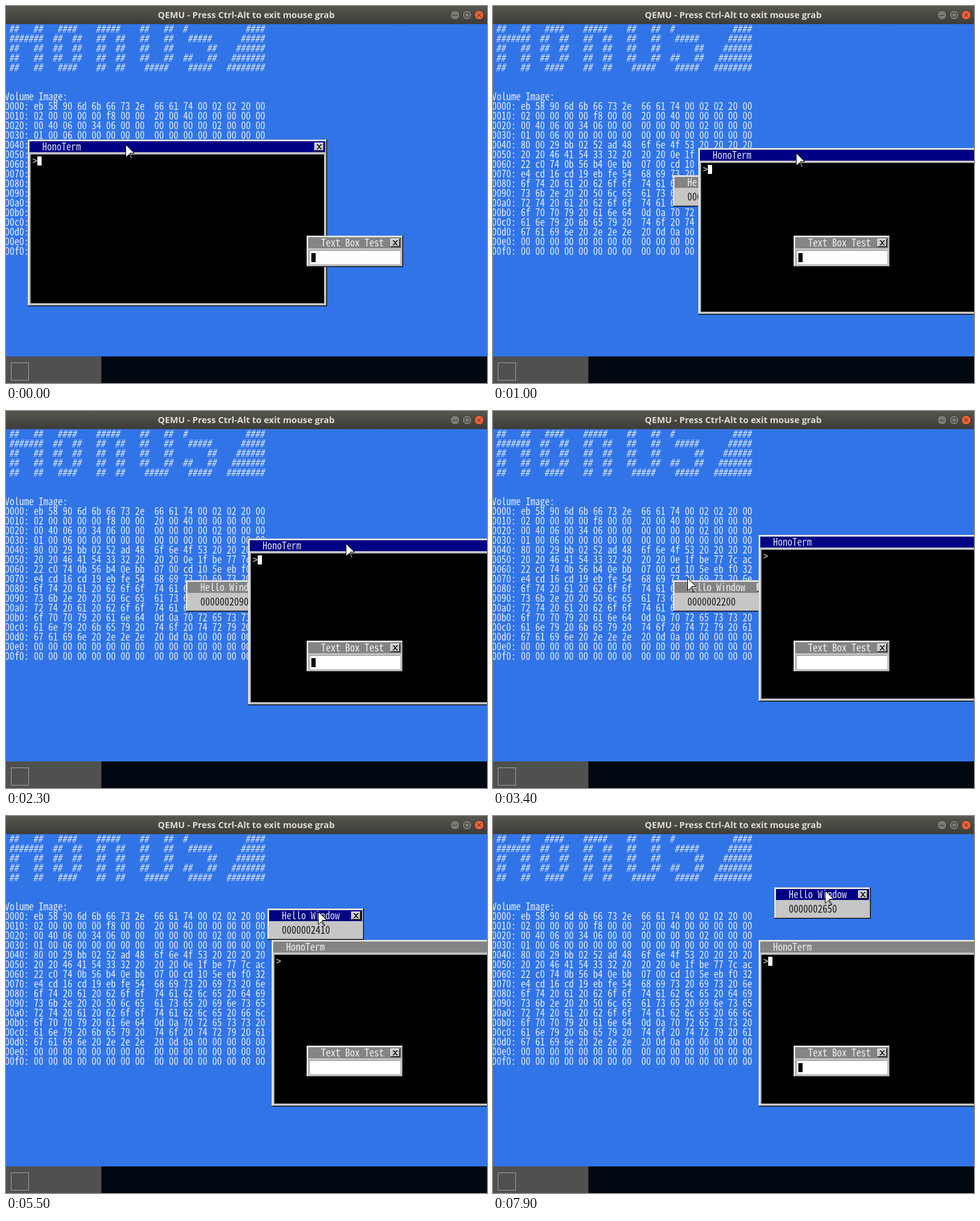
Recreate the animation shown at these times as an HTML page with a canvas. Size 797 by 624 pixels, loop 8 s.

```html
<!DOCTYPE html>
<html lang="en">
<head>
<meta charset="utf-8">
<title>QEMU</title>
<style>
html, body { margin: 0; width: 100%; height: 100%; overflow: hidden; background: #000; }
canvas { display: block; }
</style>
</head>
<body>
<canvas id="stage" width="797" height="624"></canvas>
<script>
const ctx = document.getElementById('stage').getContext('2d');
const LOOP = 8000, STEP = 100, BLINK = 500, BLINK_START = 400;
const GRAB_END = 2500, BLUR = 4100, RAISE = 4800;
const LIGHT = '#c6c6c6', DARK = '#848484', NAVY = '#000084', WHITE = '#fff', BLACK = '#000';

const BANNER = [
  ' ##   ##   ####    #####    ##   ##  #            ####',
  ' #######  ##  ##   ##  ##   ##   ##   #####      #####',
  ' ##   ##  ##  ##   ##  ##   ##   ##       ##    ######',
  ' ##   ##  ##  ##   ##  ##   ##   ##  ##   ##   #######',
  ' ##   ##   ####    ##  ##    #####    #####   ########'
];

// Boot sector of a FAT32 volume, shown as a hex dump
const toHex = s => [...s].map(c => c.charCodeAt(0).toString(16).padStart(2, '0')).join('');
const SECTOR = (
  'eb5890' + toHex('mkfs.fat') + '0002022000' +
  '0200000000f800002000400000000000' +
  '00400600340600000000000002000000' +
  '010006'.padEnd(32, '0') +
  '800029bb0252ad' + toHex('HonOS      FAT32   ') +
  '0e1fbe777cac22c0740b56b40ebb0700cd105eebf032e4cd16cd19ebfe' +
  toHex('This is not a bootable disk.  Please insert a bootable floppy and\r\n' +
    'press any key to try again ... \r\n')
).padEnd(512, '0');

const DUMP = SECTOR.match(/.{32}/g).map((row, i) => {
  const bytes = row.match(/../g);
  const half = from => bytes.slice(from, from + 8).join(' ');
  return `00${i.toString(16)}0: ${half(0)}  ${half(8)}`;
});

// Each move curves from the last place, past a control point, to its end
const HOME = { term: [36, 221], hello: [298, 280], pointer: [602, 213] };
const MOVES = [
  { who: 'term', from: 500, to: 1400, via: [310, 221], end: [584, 266] },
  { who: 'term', from: 1700, to: 2000, via: [467, 231], end: [386, 227] },
  { who: 'term', from: 2100, to: 2400, via: [366, 214], end: [440, 205] },
  { who: 'pointer', from: 2500, to: 3400, via: [120, 245], end: [322, 276] },
  { who: 'pointer', from: 3600, to: 4600, via: [390, 27], end: [382, 285] },
  { who: 'hello', from: 5000, to: 5600, via: [379, 204], end: [460, 128] },
  { who: 'hello', from: 5800, to: 5900, via: [463, 123], end: [466, 118] }
];

function place(who, t) {
  let pos = HOME[who];
  for (const m of MOVES) {
    if (m.who !== who || t <= m.from) continue;
    const k = Math.min(1, (t - m.from) / (m.to - m.from)), r = 1 - k;
    pos = pos.map((p, i) => Math.round(r * r * p + 2 * r * k * m.via[i] + k * k * m.end[i]));
  }
  return pos;
}

function pointerAt(t, term, hello) {
  if (t < GRAB_END) return [term[0] + 162, term[1] + 8];
  if (t >= RAISE) return [hello[0] + 84, hello[1] + 5];
  return place('pointer', t);
}

// The counter is only repainted when a blink, a click or a move wakes the system
function counterAt(t) {
  let woken = BLINK_START + BLINK * Math.floor((t - BLINK_START) / BLINK);
  if (t >= RAISE) woken = Math.max(woken, RAISE);
  for (const m of MOVES) if (t > m.from) woken = Math.max(woken, Math.min(t, m.to));
  return 1860 + Math.round(woken / 10);
}

function rect(x, y, w, h, color) {
  ctx.fillStyle = color;
  ctx.fillRect(x, y, w, h);
}

// Tall, light console face with an 8 px advance
const FACE = '"Noto Sans Mono CJK JP", "Noto Sans Mono CJK SC", "Noto Sans Mono", monospace';
ctx.font = `300 16px ${FACE}`;
const MONO = `300 ${128 / ctx.measureText('0').width}px ${FACE}`;

function text(str, x, y, color, style = '') {
  ctx.save();
  ctx.translate(x, y + 14);
  ctx.scale(1, 1.1);
  ctx.globalAlpha = 0.87;
  ctx.font = `${style} ${MONO}`;
  ctx.textAlign = 'left';
  ctx.textBaseline = 'alphabetic';
  ctx.fillStyle = color;
  ctx.fillText(str, 0, 0);
  ctx.restore();
}

function closeButton(x, y) {
  rect(x, y, 16, 14, BLACK);
  rect(x, y, 15, 13, DARK);
  rect(x, y, 15, 1, WHITE);
  rect(x, y, 1, 13, WHITE);
  rect(x + 1, y + 1, 13, 11, LIGHT);
  for (let i = 0; i < 8; i++) {
    rect(x + 4 + i - (i > 3), y + 3 + i, 2, 1, BLACK);
    rect(x + 10 - i + (i > 3), y + 3 + i, 2, 1, BLACK);
  }
}

function frameWindow(x, y, w, h, title, active) {
  rect(x, y, w, h, BLACK);
  rect(x, y, w - 1, h - 1, LIGHT);
  rect(x + 1, y + 1, w - 2, h - 2, DARK);
  rect(x + 1, y + 1, w - 3, h - 3, WHITE);
  rect(x + 2, y + 2, w - 4, h - 4, LIGHT);
  rect(x + 3, y + 3, w - 6, 18, active ? NAVY : DARK);
  text(title, x + 24, y + 4, WHITE);
  closeButton(x + w - 21, y + 5);
}

function textBox(x, y, w, h, color) {
  rect(x, y, w, h, LIGHT);
  rect(x, y, w - 1, h - 1, DARK);
  rect(x + 1, y + 1, w - 2, h - 2, color);
}

function drawTerm([x, y], active, blink) {
  frameWindow(x, y, 496, 276, 'HonoTerm', active);
  textBox(x + 4, y + 24, 488, 248, BLACK);
  text('>', x + 8, y + 28, WHITE);
  if (blink) rect(x + 16, y + 28, 7, 15, WHITE);
}

function drawHello([x, y], active, count) {
  frameWindow(x, y, 160, 52, 'Hello Window', active);
  text(String(count).padStart(10, '0'), x + 24, y + 28, BLACK);
}

function drawInput(blink) {
  frameWindow(498, 380, 160, 52, 'Text Box Test', false);
  textBox(502, 404, 152, 24, WHITE);
  if (blink) rect(506, 409, 7, 15, BLACK);
}

const ARROW = new Path2D('M.5 .5L14.5 14.5H7.5V16L11.5 23.5H9.5L6.2 16.5L.5 21.5Z');

function drawPointer([x, y]) {
  ctx.save();
  ctx.translate(x, y);
  ctx.fillStyle = WHITE;
  ctx.fill(ARROW);
  ctx.lineWidth = 1;
  ctx.strokeStyle = BLACK;
  ctx.stroke(ARROW);
  ctx.restore();
}

function drawDesktop() {
  rect(0, 30, 797, 550, '#3174e7');
  BANNER.forEach((s, i) => text(s, -3.5, 30 + 16 * i, WHITE, 'italic'));
  text('Volume Image:', -2, 142, WHITE);
  DUMP.forEach((s, i) => text(s, -2, 158 + 16 * i, WHITE));
  rect(0, 580, 797, 44, '#010811');
  rect(0, 580, 158, 44, '#50504e');
  ctx.lineWidth = 1;
  ctx.strokeStyle = '#a0a0a0';
  ctx.strokeRect(8.5, 590.5, 29, 29);
}

function titleButton(x, fill, icon) {
  ctx.save();
  ctx.translate(x, 15);
  ctx.beginPath();
  ctx.arc(0, 0, 7.7, 0, Math.PI * 2);
  ctx.fillStyle = fill;
  ctx.fill();
  ctx.lineWidth = 1;
  ctx.strokeStyle = '#33322e';
  ctx.stroke();
  ctx.stroke(new Path2D(icon));
  ctx.restore();
}

function drawTitleBar() {
  const g = ctx.createLinearGradient(0, 0, 0, 30);
  g.addColorStop(0, '#57564e');
  g.addColorStop(1, '#3d3c38');
  rect(0, 0, 797, 30, g);
  ctx.font = 'bold 14.7px "Open Sans", "Noto Sans", sans-serif';
  ctx.textAlign = 'center';
  ctx.textBaseline = 'alphabetic';
  ctx.fillStyle = '#dfdbd2';
  ctx.fillText('QEMU - Press Ctrl-Alt to exit mouse grab', 398, 20);
  titleButton(744, '#7d7b74', 'M-4 .5H4');
  titleButton(764, '#7d7b74', 'M-3.5-3.5h7v7h-7z');
  titleButton(784, '#ee6238', 'M-3-3L3 3M3-3L-3 3');
}

function draw(time) {
  const t = Math.floor(time / STEP) * STEP;
  const blink = (t + LOOP - BLINK_START) % (2 * BLINK) >= BLINK;
  const term = place('term', t), hello = place('hello', t);
  const raised = t >= RAISE, count = counterAt(t);

  drawDesktop();
  if (!raised) drawHello(hello, false, count);
  drawTerm(term, t < BLUR, blink);
  drawInput(blink);
  if (raised) drawHello(hello, true, count);
  drawPointer(pointerAt(t, term, hello));
  drawTitleBar();
}

const start = performance.now();
function tick() {
  draw((performance.now() - start) % LOOP);
  requestAnimationFrame(tick);
}
tick();
</script>
</body>
</html>
```
